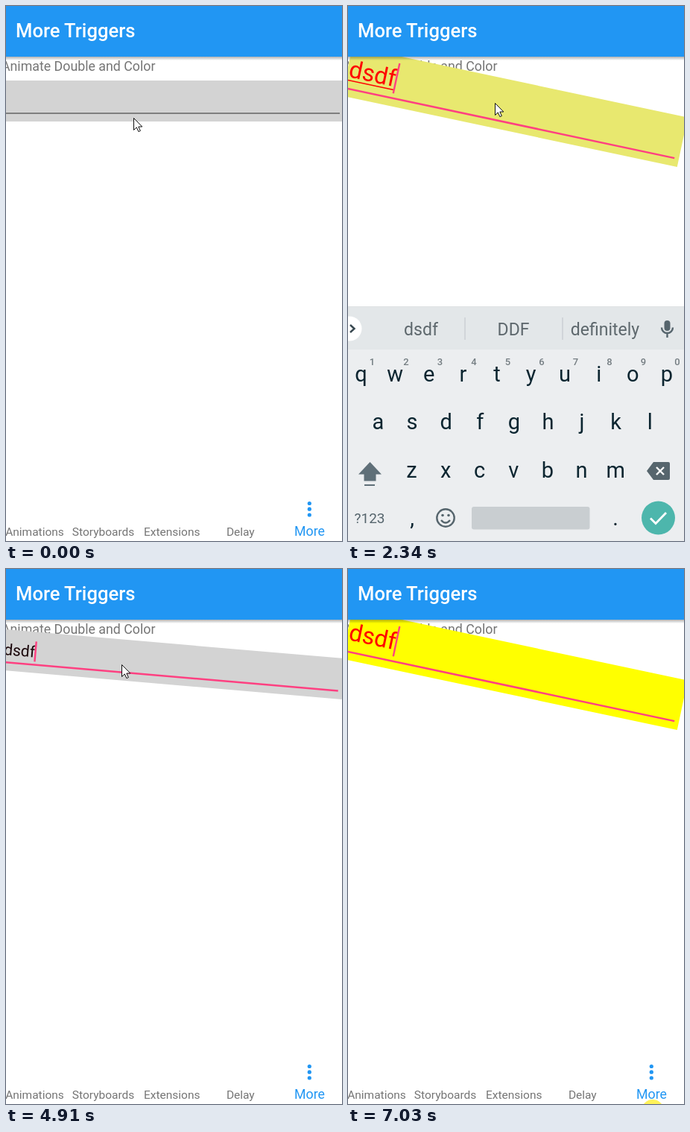
These frames come from a looping animation (451 by 718 pixels, 7.2 s). An HTML page:

```html
<!DOCTYPE html>
<html lang="en">
<head>
<meta charset="utf-8">
<title>More Triggers</title>
<style>
  html, body { margin: 0; width: 100%; height: 100%; overflow: hidden; background: #fff; }
  svg { display: block; font-family: Roboto, Arial, sans-serif; }
  .mid { text-anchor: middle; }
  .tab { font-size: 15.5px; fill: #757575; }
  .key { font-size: 29px; fill: #0b2530; }
  .digit { font-size: 13px; font-weight: 500; fill: #747d82; }
  .hint { font-size: 23px; fill: #5e686d; }
  .icon { fill: none; stroke: #56656d; stroke-width: 2.4; }
</style>
</head>
<body>
<svg width="451" height="718" viewBox="0 0 451 718">
  <defs>
    <linearGradient id="shade" x2="0" y2="1">
      <stop stop-color="#000" stop-opacity=".3"/>
      <stop offset="1" stop-color="#000" stop-opacity="0"/>
    </linearGradient>
  </defs>
  <text x="200.5" y="87" text-anchor="end" font-size="17.8" fill="#757575">Animate Double and Color</text>
  <g id="tabs">
    <g fill="#2196f3">
      <circle cx="407.3" cy="667.5" r="2.6"/><circle cx="407.3" cy="675.2" r="2.6"/><circle cx="407.3" cy="683" r="2.6"/>
      <text class="mid" x="407.5" y="711" font-size="17.8">More</text>
    </g>
  </g>

  <g id="entry">
    <rect id="field" x="-6" y="100" width="460"/>
    <path id="line"/>
    <text id="typed" x="-3.5"></text>
    <path id="compose" stroke-width="1.5"/>
    <path id="caret" stroke="#ff4081" stroke-width="2.4"/>
  </g>

  <rect width="451" height="5" y="68" fill="url(#shade)"/>
  <rect width="451" height="68" fill="#2196f3"/>
  <text x="13" y="42" font-size="25.6" font-weight="500" fill="#fff">More Triggers</text>

  <g id="keyboard">
    <rect y="403" width="451" height="2" fill="#dfe2e4"/>
    <rect y="404" width="451" height="314" fill="#eceef0"/>
    <rect y="404" width="451" height="57" fill="#e3e7e9"/>
    <path d="M157 418v30M288 418v30" stroke="#cbd0d3" stroke-width="1.5"/>
    <circle cx="2" cy="433" r="16.5" fill="#fff"/>
    <path d="M3 428l5.5 5l-5.5 5" class="icon" style="stroke:#37474f"/>
    <g id="hints"></g>
    <rect x="424.5" y="422" width="8" height="14" rx="4" fill="#56656d"/>
    <path d="M421 431.5a7.5 7.5 0 0 0 15 0M428.5 439v6" class="icon"/>
    <g id="keys"></g>
    <path d="M29.5 612L45 628.5h-7.5v9h-16v-9H14zM22 642h14v2H22z" fill="#5f6f78"/>
    <path d="M401 624l9-12h20q2 0 2 2v20q0 2-2 2h-20z" fill="#56656d"/>
    <path d="M414 619l10 10m0-10l-10 10" stroke="#fff" stroke-width="2.4"/>
    <text class="mid" x="29" y="694" font-size="19" fill="#56656d">?123</text>
    <circle cx="131" cy="687" r="11.7" class="icon"/>
    <path d="M125 690q6 7 12 0" class="icon"/>
    <circle cx="127" cy="683.5" r="1.8" fill="#56656d"/><circle cx="135" cy="683.5" r="1.8" fill="#56656d"/>
    <rect x="166" y="672" width="158.5" height="30.5" rx="3" fill="#c9ced1"/>
    <circle cx="416.5" cy="687" r="22.5" fill="#4db6ac"/>
    <path d="M406 687.5l7 7l14-14.5" fill="none" stroke="#fff" stroke-width="2.8"/>
  </g>

  <g id="pointer">
    <circle id="click" r="15" fill="#ffee20" fill-opacity=".75"/>
    <path d="M.5 .5v16l3.8-3.6l2.6 5.7l2.5-1.1l-2.6-5.5h5z" fill="#fff" stroke="#111"/>
  </g>
</svg>
<script>
const $ = id => document.getElementById(id);
const LOOP = 7200;
const SIZE = [21, 32], HEIGHT = [55, 68], ANGLE = 12, PIVOT = 219;
const GREY = [211, 211, 211], YELLOW = [255, 255, 0], DARK = [26, 6, 10], RED = [255, 0, 0];
// Pointer stops: time, x, y
const PATH = [[0, 171, 150], [60, 171, 150], [400, 197, 130], [2420, 197, 130], [2720, 248, 236],
  [3300, 248, 236], [3900, 154, 128], [4365, 154, 128], [4370, 155, 128], [5850, 155, 128],
  [6170, 346, 622], [6250, 362, 654], [6340, 378, 677], [6560, 409, 727]];
const CLICKS = [[550, 700], [2960, 3200], [4520, 4700], [6940, LOOP]];
const TYPE_AT = [1620, 1700, 1780, 1850];

const ramp = (t, start, length) => Math.min(1, Math.max(0, (t - start) / length));
const sine = p => (1 - Math.cos(Math.PI * p)) / 2;
const mix = (a, b, p) => a + (b - a) * p;
const blend = (a, b, p) => `rgb(${a.map((v, i) => Math.round(mix(v, b[i], p)))})`;
const set = (id, attrs) => { for (const k in attrs) $(id).setAttribute(k, attrs[k]); };
const show = (id, on) => set(id, { visibility: on ? "visible" : "hidden" });

function addText(parent, cls, text, x, y) {
  const el = document.createElementNS("http://www.w3.org/2000/svg", "text");
  el.setAttribute("class", "mid " + cls);
  el.setAttribute("x", x);
  el.setAttribute("y", y);
  el.textContent = text;
  $(parent).append(el);
}

["Animations", "Storyboards", "Extensions", "Delay"].forEach((s, i) => addText("tabs", "tab", s, 38.5 + 92.1 * i, 711));
[["qwertyuiop", 17.5, 504], ["asdfghjkl", 40.5, 568], ["zxcvbnm", 85.5, 633]].forEach(([row, x, y]) =>
  [...row].forEach((c, i) => addText("keys", "key", c, x + 45.6 * i, y)));
[..."1234567890"].forEach((c, i) => addText("keys", "digit", c, 32.5 + 45.5 * i, 482));
addText("keys", "key", ",", 86, 697);
addText("keys", "key", ".", 359, 697);
[["dsdf", 98], ["DDF", 222], ["definitely", 345]].forEach(([s, x]) => addText("hints", "hint", s, x, 442));

// Each focus runs rotation, text size, text colour and background in turn
function storyboard(t) {
  const at = t - (t < 4000 ? 670 : 4690);
  const back = t < 4690 ? 1 - ramp(t, 3175, 1045) : 1;
  const step = (start, length) => sine(ramp(at, start, length)) * back;
  return { turn: step(0, 500), size: step(540, 500), ink: step(980, 440), fill: step(1430, 500) };
}

function drawEntry(t) {
  const { turn, size, ink, fill } = storyboard(t);
  const focused = (t >= 690 && t < 3150) || t >= 4700;
  const h = mix(...HEIGHT, size), font = mix(...SIZE, size), base = 89 + h;
  const color = blend(DARK, RED, ink);
  set("entry", { transform: `rotate(${ANGLE * turn} ${PIVOT} ${100 + h / 2})` });
  set("field", { height: h, fill: blend(GREY, YELLOW, fill) });
  set("line", {
    d: `M-2 ${base}H448`,
    stroke: focused ? "#ff4081" : "rgba(0,0,0,.4)",
    "stroke-width": focused ? 2.5 : 1.8
  });
  const text = "dsdf".slice(0, TYPE_AT.filter(k => t >= k).length);
  $("typed").textContent = text;
  set("typed", { y: base + .5 - .5 * font, "font-size": font, fill: color });
  const end = text ? $("typed").getComputedTextLength() - 3.5 : -3.5;
  set("compose", { d: `M-3.5 ${base - .35 * font}H${end}`, stroke: color });
  show("compose", text && t < 3150);
  set("caret", { d: `M${end + .5} ${base - .2 * font}v${-1.29 * font}` });
  show("caret", focused && text);
}

function drawKeyboard(t) {
  const up = sine(ramp(t, 1500, 200)) * (1 - sine(ramp(t, 3250, 220)));
  set("keyboard", { transform: `translate(0 ${(1 - up) * 315})` });
  show("keyboard", up > 0);
  set("hints", { opacity: t >= TYPE_AT[3] ? 1 : 0 });
}

function drawPointer(t) {
  const i = PATH.findLastIndex(p => t >= p[0]);
  const a = PATH[i], b = PATH[i + 1] || a;
  const p = ramp(t, a[0], b[0] - a[0] || 1);
  set("pointer", { transform: `translate(${mix(a[1], b[1], p)} ${mix(a[2], b[2], p)})` });
  show("click", CLICKS.some(([on, off]) => t >= on && t < off));
}

const began = performance.now();
function frame() {
  const t = (performance.now() - began) % LOOP;
  drawEntry(t);
  drawKeyboard(t);
  drawPointer(t);
  requestAnimationFrame(frame);
}
frame();
</script>
</body>
</html>
```
